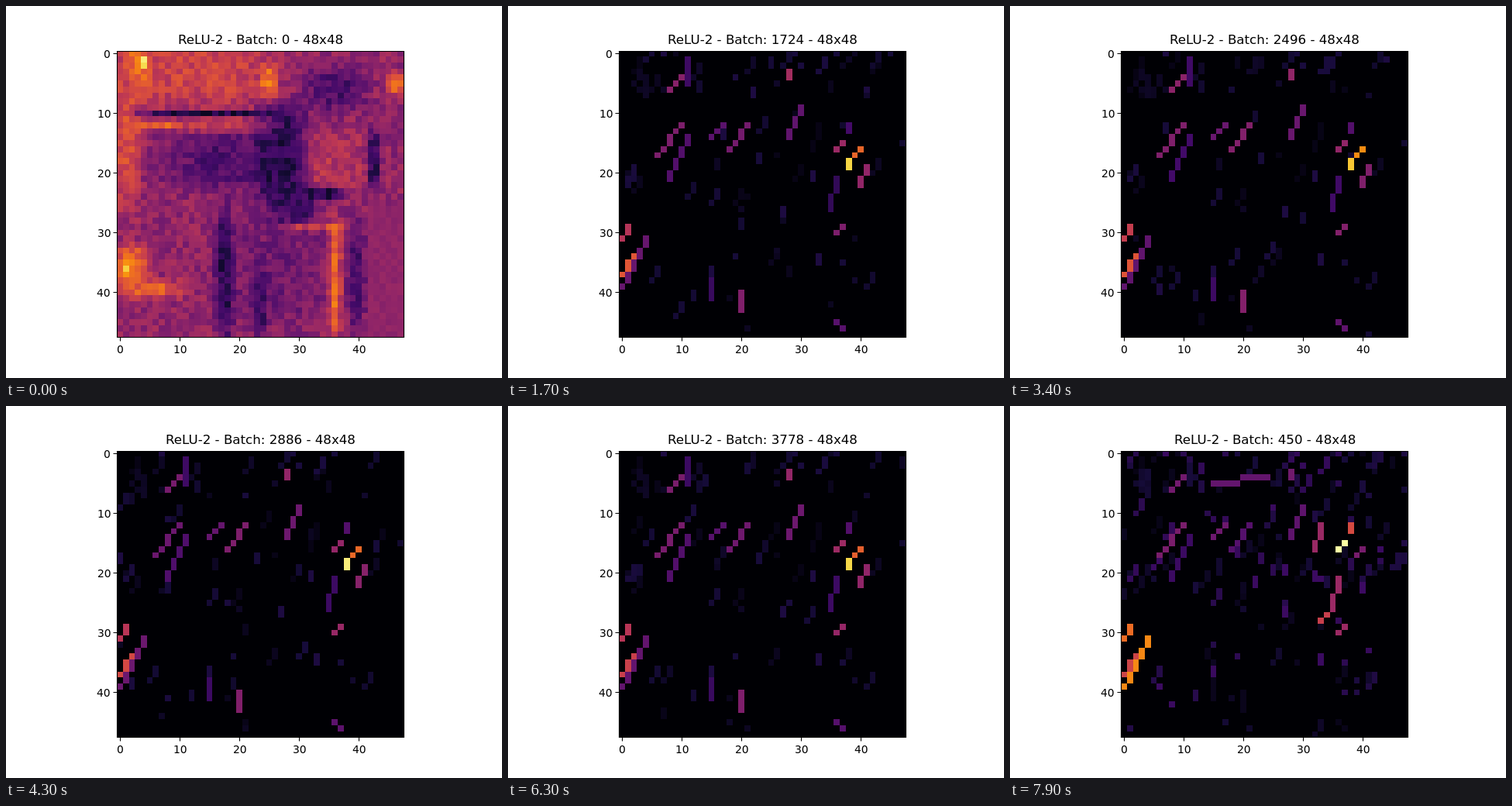
Animation, 640 px wide and 480 px high, one loop 8000 ms. Source, as an HTML page with a canvas:

```html
<!DOCTYPE html>
<html lang="en">
<head>
<meta charset="utf-8">
<title>ReLU activations</title>
<style>
  html, body { margin: 0; width: 640px; height: 480px; overflow: hidden; background: #fff; }
  canvas, svg { position: absolute; left: 0; top: 0; display: block; }
  path { fill: none; stroke: #000; stroke-width: 1.11; }
</style>
</head>
<body>
<canvas id="map" width="640" height="480"></canvas>
<svg id="axes" width="640" height="480">
  <path d="M143.5 58.5h370v369h-370z"/>
</svg>
<script>
const N = 48, LEFT = 143.2, TOP = 57.6, CELL = 7.7;
const STEP = 100, FRAMES = 80;
const TITLE_SIZE = 16.667, LABEL_SIZE = 13.889;
const ctx = document.getElementById('map').getContext('2d');
const svg = document.getElementById('axes');

// Inferno colour map, evenly spaced stops
const STOPS = [[0, 0, 4], [22, 11, 57], [66, 10, 104], [106, 23, 110], [147, 38, 103],
  [188, 55, 84], [221, 81, 58], [243, 120, 25], [252, 165, 10], [246, 215, 70], [252, 255, 164]];

// Soft patches of the untrained map: level, centre x, y, radius x, y
const PATCHES = [
  [.54, 11, 3, 16, 6], [.68, 3, 2, 2, 3], [.95, 4, 1.5, .7, 1], [.7, 25, 5, 1.5, 3],
  [.23, 36, 6, 5, 3.5], [.68, 46, 5, 1.5, 2], [.57, 1, 15, 2.5, 11], [.24, 20, 18, 12, 5],
  [.14, 27, 17, 4, 9], [.12, 15, 10, 12, .6], [.65, 6, 12, 5, .8], [.5, 17, 12, 8, 1.2],
  [.48, 36, 18, 5, 5], [.16, 42.5, 18, 1, 5], [.11, 33, 23.5, 5, 1], [.17, 29, 26, 4, 3],
  [.31, 26, 37, 8, 9], [.15, 17.5, 37, 1.5, 11], [.21, 23.5, 42, 1.2, 6], [.22, 39.5, 37, 1.5, 9],
  [.54, 33, 29, 5, .7], [.67, 36, 38, 1, 10], [.66, 2, 36, 3, 4], [.63, 5, 39.5, 6, 1.5],
  [.95, 1, 36, .8, 1]
];

// Edges the layer responds to: x, y, dx, dy, level when young, level when trained
const STREAKS = [
  [0, 39, 4, -8, .7, .28], [0, 37, 2, -3, .5, .58], [0, 31, 1, -2, .74, .5],
  [6, 17, 4, -5, .33, .33], [8, 21, 3, -7, .2, .22], [8, 6, 2, -2, .3, .35],
  [11, 5, 0, -4, .1, .19], [15, 14, 2, -2, .28, .28], [18, 16, 3, -4, .27, .34],
  [28, 4, 0, -1, .3, .42], [28, 14, 2, -5, .27, .29], [32, 16, 1, -4, .4, .03],
  [36, 16, 1, -1, 1, .42], [38, 13, 0, -1, .6, .22], [38, 19, 0, -1, .15, .95],
  [39, 17, 1, -1, .35, .68], [41, 19, -1, 3, .12, .38], [35, 26, 1, -5, .43, .18],
  [36, 30, 1, -1, .42, .38], [33, 28, 1, -1, .5, 0], [15, 41, 0, -3, .04, .19],
  [20, 43, 0, -3, .04, .33], [36, 45, 1, 1, .04, .25], [24, 4, -9, 1, .28, 0]
];

// Even batch numbers come in alphabetical order, sampled between known steps
const ORDER = Array.from({ length: 2500 }, (_, i) => String(i * 2)).sort();
const KNOWN = [[0, 0], [10, 1432], [24, 2014], [34, 2496], [52, 3278], [63, 3778], [79, 450]]
  .map(([at, batch]) => ({ at, rank: ORDER.indexOf(String(batch)) }));

function rnd(a, b) {
  const s = Math.sin(a * 12.9898 + b * 78.233 + 4.7) * 43758.5453;
  return s - Math.floor(s);
}
const mix = (a, b, k) => a + (b - a) * k;
const clamp = v => Math.max(0, Math.min(1, v));
const edge = (start, k) => Math.round(start + CELL * k);

function batchAt(i) {
  const n = Math.max(1, KNOWN.findIndex(p => p.at >= i));
  const a = KNOWN[n - 1], b = KNOWN[n];
  return +ORDER[Math.round(mix(a.rank, b.rank, (i - a.at) / (b.at - a.at)))];
}

function untrained(c) {
  const x = c % N, y = Math.floor(c / N);
  let v = .39;
  for (const [level, cx, cy, rx, ry] of PATCHES)
    v = mix(v, level, Math.exp(-(((x - cx) / rx) ** 4) - ((y - cy) / ry) ** 4));
  const grain = x > 41 && y > 25 ? .05 : .15;
  return v + grain * (rnd(c, 3) - .5);
}
const RAW = Float32Array.from({ length: N * N }, (_, c) => untrained(c));

function streak(map, x, y, dx, dy, level) {
  const n = Math.max(Math.abs(dx), Math.abs(dy), 1);
  for (let s = 0; s <= n; s++) {
    const cx = Math.round(x + dx * s / n), cy = Math.round(y + dy * s / n);
    if (cx < 0 || cx >= N || cy < 0 || cy >= N) continue;
    map[cy * N + cx] = Math.max(map[cy * N + cx], level);
  }
}

// Short faint edges, most of them staying put from step to step
function addStrays(map, i, early) {
  const count = mix(75, 150, early);
  for (let k = 0; k < count; k++) {
    const seed = rnd(k, 5) < .6 ? 1 : i + 10;
    const x = Math.floor(N * rnd(k, seed)), y = Math.floor(N * rnd(k, seed + .3) ** 1.4);
    if (x > 41 && y > 20) continue;
    const rise = -Math.floor(3 * rnd(k, seed + .6));
    streak(map, x, y, rise < -1 ? 1 : 0, rise, mix(.03, mix(.12, .19, early), rnd(k, seed + .9)));
  }
}

function activations(i, batch) {
  const early = clamp((1000 - batch) / 550), fresh = clamp(1 - batch / 150);
  const map = new Float32Array(N * N);
  addStrays(map, i, early);
  STREAKS.forEach(([x, y, dx, dy, young, trained], k) => {
    const flicker = 1 + .2 * (rnd(k, i + 50) - .5);
    streak(map, x, y, dx, dy, mix(trained, young, early) * flicker);
  });
  return map.map((v, c) => mix(v, RAW[c], fresh));
}

function color(v) {
  const p = clamp(v) * 10, k = Math.min(9, Math.floor(p));
  return `rgb(${STOPS[k].map((c, n) => Math.round(mix(c, STOPS[k + 1][n], p - k)))})`;
}

function add(tag, attrs) {
  const el = document.createElementNS('http://www.w3.org/2000/svg', tag);
  for (const name in attrs) el.setAttribute(name, attrs[name]);
  return svg.appendChild(el);
}

// Aligns by the inked width and starts on a whole pixel
function setText(el, text, size, x, y, align) {
  const font = `${size}px "DejaVu Sans", sans-serif`;
  ctx.font = font;
  const m = ctx.measureText(text);
  const ink = m.actualBoundingBoxLeft + m.actualBoundingBoxRight;
  el.style.font = font;
  el.setAttribute('x', Math.round(x - ink * align));
  el.setAttribute('y', y);
  el.textContent = text;
}

function addAxes() {
  for (let n = 0; n < N; n += 10) {
    const x = LEFT + CELL * (n + .5), y = edge(TOP, n + .5) + .5;
    add('path', { d: `M${Math.round(x) + .5} 427.5v5M143.5 ${y}h-5` });
    setText(add('text'), n, LABEL_SIZE, x, 448, .5);
    setText(add('text'), n, LABEL_SIZE, 133.5, y + 5.5, 1);
  }
}

function draw(i) {
  const batch = batchAt(i);
  setText(title, `ReLU-2 - Batch: ${batch} - 48x48`, TITLE_SIZE, 328, 49, .5);
  activations(i, batch).forEach((v, c) => {
    const x = c % N, y = Math.floor(c / N);
    const px = edge(LEFT, x), py = edge(TOP, y);
    ctx.fillStyle = color(v);
    ctx.fillRect(px, py, edge(LEFT, x + 1) - px, edge(TOP, y + 1) - py);
  });
}

const title = add('text');
let shown = -1;
function tick() {
  const i = Math.floor(performance.now() / STEP) % FRAMES;
  if (i !== shown) draw(shown = i);
  requestAnimationFrame(tick);
}
addAxes();
tick();
</script>
</body>
</html>
```
